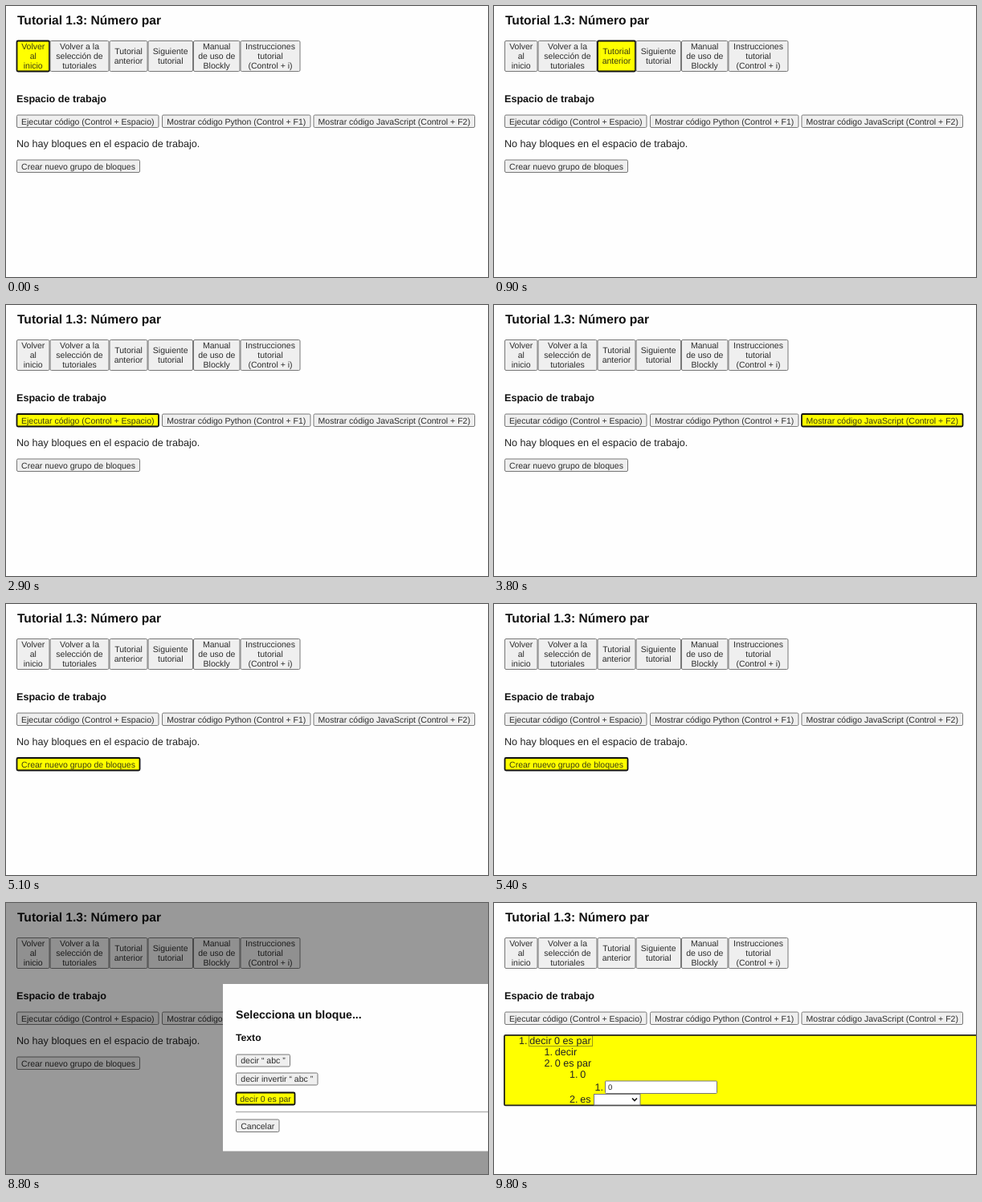
An HTML page that plays this animation: 600 px wide and 338 px high, repeating every 9.9 s.

```html
<!DOCTYPE html>
<html lang="es">
<head>
<meta charset="utf-8">
<title>Tutorial 1.3</title>
<style>
html, body { margin: 0; width: 100%; height: 100%; overflow: hidden; background: #fefefe; }
svg { display: block; width: 600px; height: 338px; }
text { font-family: "Liberation Sans", Arial, sans-serif; font-size: 12.6px; fill: #222; text-rendering: geometricPrecision; white-space: pre; }
.bold { font-weight: bold; fill: #111; }
.btn rect { fill: #efefef; stroke: #777; }
.btn text { font-size: 10.5px; fill: #2c2c2c; }
.btn.focus rect { fill: #ff0; stroke: #111; stroke-width: 1.8px; }
.btn.focus text { fill: #3a3a10; }
.field { fill: #fff; stroke: #767676; }
</style>
</head>
<body>
<svg viewBox="0 0 600 338">
  <g id="page"></g>
  <g id="tree"></g>
  <g id="dialog"></g>
</svg>
<script>
const LOOP = 9900;
const OPEN = 5600, CLOSE = 9200;
// Start time of the focus on each button, in tab order; the dialog follows the page.
const focusTimes = [0, 500, 900, 1300, 1700, 2100, 2500, 3100, 3600, 4100, OPEN, 6700, 7200, CLOSE];
const buttons = [];
const [page, tree, dialog] = ["page", "tree", "dialog"].map(id => document.getElementById(id));

function add(parent, tag, attrs, content = "") {
  const el = document.createElementNS("http://www.w3.org/2000/svg", tag);
  for (const key in attrs) el.setAttribute(key, attrs[key]);
  el.textContent = content;
  parent.append(el);
  return el;
}

function label(parent, x, y, content, size = 12.6, cls = "") {
  add(parent, "text", { x, y, class: cls, style: `font-size:${size}px` }, content);
}

function box(parent, x, y, right, bottom, attrs) {
  return add(parent, "rect", { x: x + .5, y: y + .5, width: right - x - 1, height: bottom - y - 1, ...attrs });
}

function button(parent, x, y, right, bottom, lines, shrink = 0) {
  const g = add(parent, "g", { class: "btn" });
  const rect = box(g, x, y, right, bottom, { rx: 1.5 });
  const first = (y + bottom) / 2 + 3.9 - (lines.length - 1) * 6;
  const texts = lines.map((line, i) => add(g, "text", {
    x: (x + right) / 2, y: first + i * 12, "text-anchor": "middle"
  }, line));
  buttons.push({ g, rect, texts, width: right - x - 1, shrink, mid: (x + right) / 2 });
}

label(page, 14, 23, "Tutorial 1.3: Número par", 15.6, "bold");
const bar = [13, 54.5, 128.5, 176.5, 233, 291.5, 366.5];
[
  "Volver|al|inicio", "Volver a la|selección de|tutoriales", "Tutorial|anterior",
  "Siguiente|tutorial", "Manual|de uso de|Blockly", "Instrucciones|tutorial|(Control + i)"
].forEach((s, i) => button(page, bar[i], 43, bar[i + 1], 82, s.split("|")));

label(page, 13, 120, "Espacio de trabajo", 12.6, "bold");
button(page, 13, 135.5, 190.5, 152, ["Ejecutar código (Control + Espacio)"]);
button(page, 194, 135.5, 379.5, 152, ["Mostrar código Python (Control + F1)"]);
button(page, 382.5, 135.5, 584, 152, ["Mostrar código JavaScript (Control + F2)"]);
const empty = add(page, "g");
label(empty, 13, 175.8, "No hay bloques en el espacio de trabajo.");
button(empty, 13, 191.5, 167, 208, ["Crear nuevo grupo de bloques"]);

add(dialog, "rect", { width: 600, height: 338, opacity: .4 });
add(dialog, "rect", { x: 270, y: 101, width: 330, height: 208.5, fill: "#fefefe" });
label(dialog, 286, 143.6, "Selecciona un bloque...", 14.1, "bold");
label(dialog, 286, 172.2, "Texto", 12.2, "bold");
button(dialog, 286, 188.5, 354, 204.5, ["decir “ abc ”"], 2);
button(dialog, 286, 211.5, 388.5, 227.5, ["decir invertir “ abc ”"], 2);
button(dialog, 286, 236, 362, 252, ["decir 0 es par"], 2);
add(dialog, "path", { d: "M286 260.5H600", stroke: "#b4b4b4", "stroke-width": 1.3 });
button(dialog, 286, 269.5, 340.5, 286, ["Cancelar"]);

add(tree, "rect", { x: 12.9, y: 164.9, width: 600, height: 87.5, rx: 1.5, fill: "#ff0", stroke: "#222", "stroke-width": 1.8 });
[
  [31, 175.8, "1.", "decir 0 es par"], [62.5, 189.8, "1.", "decir"], [62.5, 204, "2.", "0 es par"],
  [94, 218, "1.", "0"], [125.5, 233.6, "1.", ""], [94, 249, "2.", "es"]
].forEach(([x, y, num, s]) => {
  label(tree, x, y, num);
  label(tree, x + 13.3, y, s);
});
box(tree, 43, 165, 123, 179, { fill: "none", stroke: "#333", "stroke-dasharray": "1 1" });
box(tree, 138, 221.5, 278, 238, { class: "field", rx: 1 });
label(tree, 142, 233.4, "0", 9.5);
box(tree, 124, 238, 182.5, 252.5, { class: "field" });
add(tree, "path", { d: "M172 243.5l3 3 3-3", fill: "none", stroke: "#111", "stroke-width": 1.6 });

const show = (el, on) => el.style.display = on ? "" : "none";

function draw(now) {
  const t = now % LOOP;
  const current = focusTimes.filter(start => start <= t).length - 1;
  buttons.forEach((b, i) => {
    const on = i === current && t < CLOSE;
    const cut = on ? b.shrink : 0;
    b.g.classList.toggle("focus", on);
    b.rect.setAttribute("width", b.width - cut);
    b.texts.forEach(el => el.setAttribute("x", b.mid - cut / 2));
  });
  show(dialog, t >= OPEN && t < CLOSE);
  show(empty, t < CLOSE);
  show(tree, t >= CLOSE);
}

const begin = performance.now();
function loop() {
  draw(performance.now() - begin);
  requestAnimationFrame(loop);
}
loop();
</script>
</body>
</html>
```
